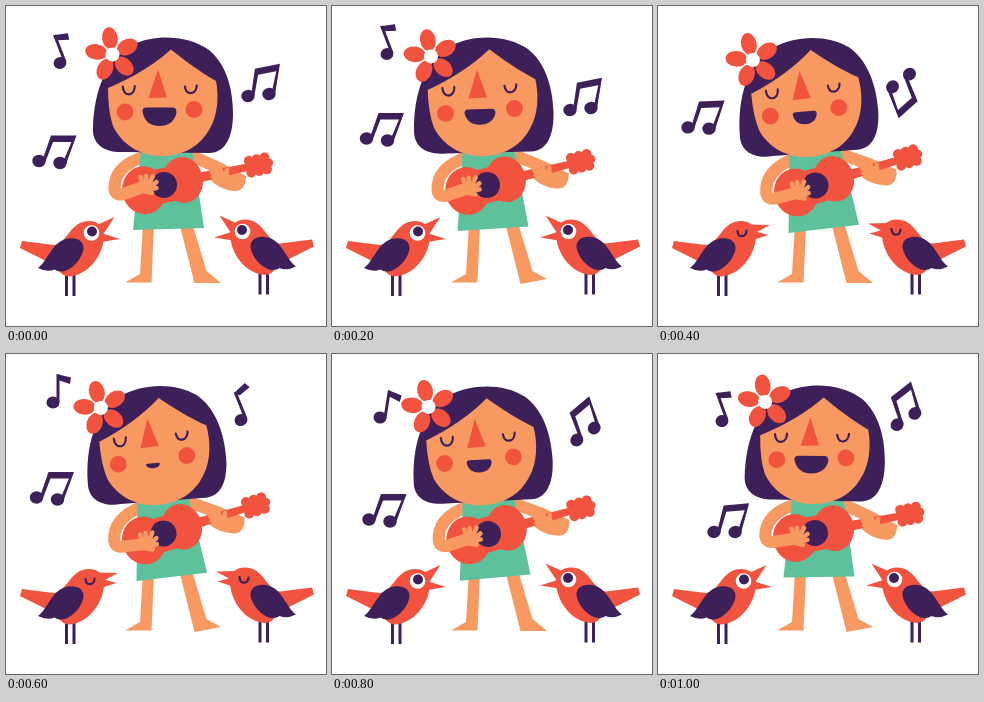
Recreate the animation shown at these times as an HTML page. Size 320 px wide and 320 px high, loop 1200 ms.

```html
<!DOCTYPE html>
<html lang="en">
<head>
<meta charset="utf-8">
<title>Ukulele song</title>
<style>
  html, body { margin: 0; height: 100%; overflow: hidden; background: #fff; }
  svg { display: block; width: 100%; height: 100%; }
  .ink { fill: #3d2059; }
  .red { fill: #f1533f; }
  .skin { fill: #f89961; }
  .green { fill: #5dc19b; }
  .line { fill: none; stroke: #3d2059; stroke-width: 2.2; stroke-linecap: round; }
  .limb { fill: none; stroke: #f89961; stroke-linecap: round; stroke-linejoin: round; }
</style>
</head>
<body>
<svg viewBox="0 0 320 320">
  <defs>
    <g id="pair" class="ink">
      <ellipse cx="-10.5" cy="-1" rx="6.7" ry="6.2"/>
      <ellipse cx="10.5" cy="1" rx="6.7" ry="6.2"/>
      <path d="M-7-2L1.5-26.500H27L16.500 2L13.500 0L22-20H3.500L-4.200 0Z"/>
    </g>
    <g id="stem" class="ink">
      <ellipse rx="6.500" ry="6"/>
      <path d="M3.500 0V-28H6.500V0Z"/>
    </g>
    <path id="flag" class="ink" d="M3.500-28.500L18-25L17-18.500L5-22.500Z"/>
    <ellipse id="petal" class="red" cx="16.500" rx="11" ry="7.800"/>
    <g id="bird">
      <path class="ink" d="M59 266h3v24h-3zM66.500 266h3v24h-3z"/>
      <path class="red" d="M16 235L48 239C62 237 64 215 83 215C93 215 99 222 98 232C96 251 82 269 63 270.500Q57 270 53 265L38 254L14 242Z"/>
      <path class="ink" d="M62 232.500C71 231 78 235 77.500 243C76 252 68 262 59 265Q52 266.500 48.500 263.500Q41 266.500 32 262C42 255 46 235 62 232.500Z"/>
      <g class="awake">
        <path class="red" d="M91 219L108.500 211L98 227ZM95 227L114 233L95 236Z"/>
        <circle cx="85.500" cy="227" r="7.800" fill="#fff"/>
        <circle class="ink" cx="86" cy="225.500" r="5"/>
      </g>
      <g class="asleep">
        <path class="red" d="M91 218.500L112 219L97 227ZM96 225L110.500 229L95 234Z"/>
        <path class="line" d="M79.500 225C80 232 88 232 88.500 224.500"/>
      </g>
    </g>
  </defs>

  <path class="skin" d="M137 218L134 268L119 276.500H145.500L148 218Z"/>
  <path id="leg" class="skin"/>

  <g id="girl">
    <path class="limb" stroke-width="12" d="M140 150Q107.500 160 108.500 183"/>
    <path class="skin" d="M185 143L216 157L240 170C240 178 237 186 228 185C218 184 208 179 203 172L212 168L200 163Q190 158 185 157Z"/>
    <path class="green" d="M135 143L186 143L198 222L127 224Z"/>

    <path class="ink" d="M87 122C88 85 100 52 128 38C150 28 182 29 203 44C220 58 227 82 227 108C227 128 221 147 203 147L118 146C98 147 86 138 87 122Z"/>
    <path class="skin" d="M165 43.500C178 54 194 66 210 75C213 90 212 110 203 124C192 143 174 150 155 150C135 150 116 139 107 120Q102 106 102 82Q140 66 165 43.500Z"/>
    <path class="red" d="M152 63.500L161 91.500L142.500 92Z"/>
    <circle class="red" cx="119" cy="106" r="8.400"/>
    <circle class="red" cx="188" cy="103.500" r="8.400"/>
    <path class="line" d="M116.800 80.500C117 91 128.500 91 128.800 80M179 80.500C179.500 90 190.500 89 190.800 79.500"/>
    <path id="mouth" class="ink" d="M-17-5Q-17-9-13-9H13Q17-9 17-4C15 6 8 9.500 0 9.500C-8 9.500-15 6-17-5Z"/>
    <g id="flower" transform="translate(106.500 48.500)"></g>

    <g transform="translate(158 179) rotate(-12)">
      <ellipse class="red" cx="-20.500" cy="1" rx="22" ry="24"/>
      <ellipse class="red" cx="19.500" cy="-1" rx="20" ry="23"/>
      <path class="red" d="M-20-17H18V18H-20ZM32-5L90-3.500V3.500L32 5Z"/>
      <circle class="ink" r="13"/>
      <g id="pegs" class="red"><ellipse cx="97" rx="11" ry="7"/></g>
    </g>
    <path class="limb" stroke-width="4.500" d="M210 172L206 166M213 172L209 162M216 172L214.500 161.500M219 172L221 164"/>
    <path class="skin" d="M204 171L210 166L222 165L228 182L214 179Z"/>
    <path id="forearm" class="limb" stroke-width="12"/>
    <path id="hand" class="limb" stroke-width="4.500" d="M137 182L134.500 172M140 181L140 171M142 181L147 171M143 183L150.500 177M142 185L150.500 183M138 186L146 188"/>
  </g>

  <use href="#bird"/>
  <use href="#bird" transform="translate(322 -1.500) scale(-1 1)"/>
  <g id="notes"></g>
</svg>

<script>
const $ = id => document.getElementById(id);
const use = (id, transform) => `<use href="#${id}" transform="${transform}"/>`;
const pair = (x, y, turn) => use('pair', `translate(${x} ${y}) rotate(${turn})`);
const single = (x, y, turn, bend = 0) => {
  const place = `translate(${x} ${y}) rotate(${turn})`;
  return use('stem', place) + use('flag', `${place} rotate(${bend} 5 -28)`);
};

$('flower').innerHTML = [0, 1, 2, 3, 4].map(i => use('petal', `rotate(${i * 72 - 99})`)).join('')
  + '<circle r="7" fill="#fff"/>';
$('pegs').innerHTML += [0, 1, 2, 3, 4, 5].map(i =>
  `<circle cx="${88 + (i % 3) * 8}" cy="${i < 3 ? -6 : 6}" r="5"/>`).join('')
  + '<circle cx="107" r="4.500"/>';

// lean: dx, dy, degrees; mouth: width, height; hand: drop along the strings
const poses = [
  { lean: [0, 0, 0], mouth: [34, 19], hand: -1,
    notes: [single(54, 57, -21), pair(43.5, 156, 0), pair(252.5, 89, -11)] },
  { lean: [-3, 0, -2], mouth: [31, 16], hand: 0,
    notes: [single(55, 48, -21), pair(45, 133.5, 0), pair(248.5, 103, -11)] },
  { lean: [-0.5, 0.5, -5], mouth: [24, 13], hand: 3, asleep: true,
    notes: [pair(40.5, 122, -2), pair(243, 74.5, 138)] },
  { lean: [-0.5, 0.5, -5], mouth: [14, 5], hand: 6, asleep: true,
    notes: [single(47, 48.5, 0), single(235, 66, -22, -35), pair(41, 144.5, 0)] },
  { lean: [-2, 1, -3.5], mouth: [25, 13], hand: 1,
    notes: [single(48, 63.5, 9), pair(47.5, 166.5, 0), pair(253.5, 80, -40)] },
  { lean: [-1, 0, 0.7], mouth: [34, 18], hand: 3,
    notes: [single(64, 67, -20), pair(66.5, 178, -5), pair(248, 65, -38)] }
];

function show({ lean: [x, y, turn], mouth: [w, h], hand, asleep, notes }, tap) {
  $('girl').setAttribute('transform', `translate(${x} ${y}) rotate(${turn} 158 179)`);
  $('mouth').setAttribute('transform', `translate(153.500 110.500) scale(${w / 34} ${h / 19})`);
  $('forearm').setAttribute('d', `M108.500 182Q108.500 189 116 188.500L137 ${182 + hand}`);
  $('hand').setAttribute('transform', `translate(0 ${hand})`);
  $('leg').setAttribute('d', `M173 216L188.500 ${tap ? 278 : 277}L215 ${tap ? 273 : 277}L200.500 265L185.500 215Z`);
  $('notes').innerHTML = notes.join('');
  document.querySelector('.awake').style.display = asleep ? 'none' : '';
  document.querySelector('.asleep').style.display = asleep ? '' : 'none';
}

let last;
function tick() {
  const step = Math.floor(performance.now() / 200) % poses.length;
  if (step !== last) show(poses[step], step % 2);
  last = step;
  requestAnimationFrame(tick);
}
tick();
</script>
</body>
</html>
```
